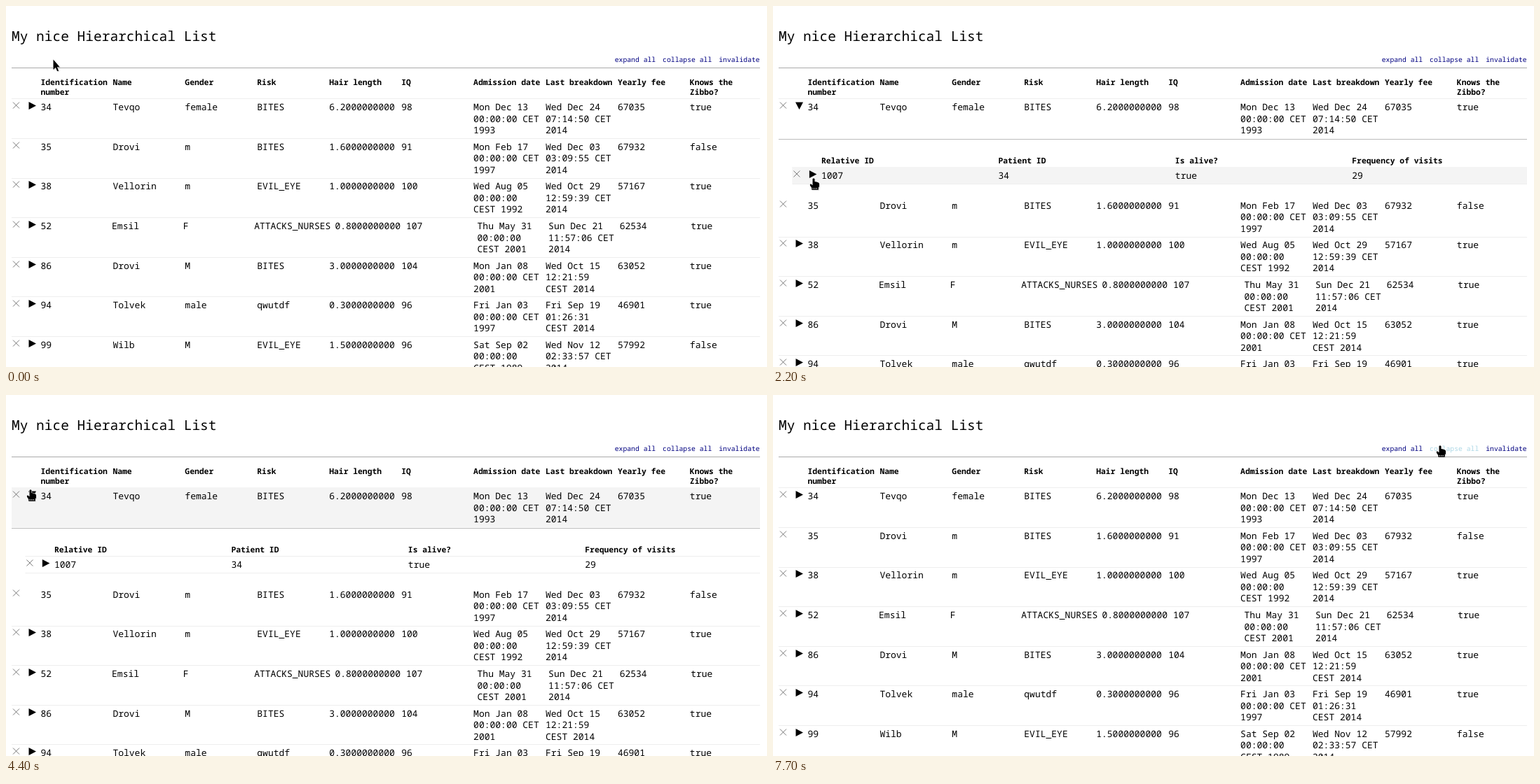
Recreate the animation shown at these times as an HTML page. Size 1086x516 px, loop 8 s.

```html
<!DOCTYPE html>
<html lang="en">
<head>
<meta charset="utf-8">
<title>Hierarchical list</title>
<style>
  html, body { margin: 0; width: 100%; height: 100%; overflow: hidden; background: #fff; }
  svg { display: block; width: 1086px; height: 516px; }
  text {
    font: 13px "Noto Sans Mono", "DejaVu Sans Mono", monospace;
    text-rendering: geometricPrecision;
  }
  .title { font-size: 19.5px; }
  .head { font-size: 11.35px; font-weight: 700; }
  .link { font-size: 9.75px; fill: #000080; }
  .link.hover { fill: #add8e6; }
</style>
</head>
<body>
<svg id="stage" viewBox="0 0 1086 516"></svg>
<script>
const LOOP = 8000, STEP = 100;
const LEFT = 8, RIGHT = 1076, INDENT = 19.4, PAD = 6;
const BODY = { size: 13, line: 16.5, base: 16.8, space: 7.1, cls: '' };
const HEAD = { size: 11.35, line: 13.6, base: 14.8, space: 6.7, cls: 'head' };
const stage = document.getElementById('stage');

const phones = {
  heads: ['Phone ID', 'ID of the relative', 'Phone'],
  rows: ['2008;1007;+(100)-555-0142']
};
const relatives = {
  heads: ['Relative ID', 'Patient ID', 'Is alive?', 'Frequency of visits'],
  rows: ['1007;34;true;29'],
  child: phones
};
const patients = {
  heads: ['Identification number', 'Name', 'Gender', 'Risk', 'Hair length', 'IQ',
    'Admission date', 'Last breakdown', 'Yearly fee', 'Knows the Zibbo?'],
  rows: [
    '34;Tevqo;female;BITES;6.2000000000;98;Mon Dec 13 00:00:00 CET 1993;Wed Dec 24 07:14:50 CET 2014;67035;true',
    '35;Drovi;m;BITES;1.6000000000;91;Mon Feb 17 00:00:00 CET 1997;Wed Dec 03 03:09:55 CET 2014;67932;false',
    '38;Vellorin;m;EVIL_EYE;1.0000000000;100;Wed Aug 05 00:00:00 CEST 1992;Wed Oct 29 12:59:39 CET 2014;57167;true',
    '52;Emsil;F;ATTACKS_NURSES;0.8000000000;107;Thu May 31 00:00:00 CEST 2001;Sun Dec 21 11:57:06 CET 2014;62534;true',
    '86;Drovi;M;BITES;3.0000000000;104;Mon Jan 08 00:00:00 CET 2001;Wed Oct 15 12:21:59 CEST 2014;63052;true',
    '94;Tolvek;male;qwutdf;0.3000000000;96;Fri Jan 03 00:00:00 CET 1997;Fri Sep 19 01:26:31 CEST 2014;46901;true',
    '99;Wilb;M;EVIL_EYE;1.5000000000;96;Sat Sep 02 00:00:00 CEST 1989;Wed Nov 12 02:33:57 CET 2014;57992;false'
  ],
  childless: 1,
  child: relatives
};

// pointer moves: start, end, x, y reached
const moves = [
  [0, 600, 30, 136], [600, 700, 35, 139],
  [1000, 1500, 67, 226], [1700, 1900, 52, 247], [2000, 2200, 58, 246],
  [3400, 3500, 52, 235], [4100, 4200, 38, 153], [4300, 4400, 35, 135],
  [5300, 5400, 167, 200], [5500, 5900, 589, 424], [6000, 6100, 723, 258],
  [6200, 6400, 872, 101], [6400, 6700, 884, 74], [6900, 7300, 955, 68], [7400, 7500, 952, 72]
];

const ease = k => k * k * (3 - 2 * k);

function pointerAt(t) {
  let x = 67, y = 76;
  for (const [start, end, toX, toY] of moves) {
    const k = ease(Math.min(1, Math.max(0, (t - start) / (end - start))));
    x += (toX - x) * k;
    y += (toY - y) * k;
  }
  return { x, y };
}

const depthAt = t => (t >= 1000 && t < 5300) + (t >= 3500 && t < 4000);

const inside = (p, x, y, w, h) => p.x >= x && p.x < x + w && p.y >= y && p.y < y + h;

const text = (x, y, s, cls = '') =>
  `<text class="${cls}" x="${x}" y="${Math.round(y)}">${s}</text>`;

const bar = (x, y, h, fill) =>
  `<rect x="${x}" y="${Math.round(y)}" width="${RIGHT - x}" height="${Math.round(h)}" fill="${fill}"/>`;

const cross = (x, y) =>
  `<path d="M${x - 4.5} ${y - 4.5}l9 9m0-9l-9 9" stroke="#777" fill="none"/>`;

const triangle = (x, y, down) =>
  `<path d="M${x - 5} ${y - 5.5}v11l10.5-5.5z" transform="rotate(${down ? 90 : 0} ${x} ${y})"/>`;

function wrap(s, max) {
  const lines = [];
  for (const word of s.split(' ')) {
    const joined = lines.length ? lines.at(-1) + ' ' + word : word;
    if (lines.length && joined.length <= max) lines[lines.length - 1] = joined;
    else lines.push(word);
  }
  return lines;
}

// equal columns, except that a long word widens its own column
function layout(cells, level, style) {
  const char = style.size * .6, start = 49.5 + INDENT * level, total = 1078.8 - start;
  const even = total / cells.length;
  const needs = cells.map(c => PAD + char * Math.max(...c.split(' ').map(w => w.length)));
  const wide = needs.filter(n => n > even);
  const rest = (total - wide.reduce((a, b) => a + b, 0)) / (cells.length - wide.length);
  let x = start;
  const columns = cells.map((c, i) => {
    const width = needs[i] > even ? needs[i] : rest;
    const column = { x, lines: wrap(c, Math.floor((width - PAD) / char)) };
    x += width;
    return column;
  });
  const rows = Math.max(...columns.map(c => c.lines.length));
  return { columns, height: rows * style.line + style.space };
}

function drawRow(p, cells, level, y, style, open) {
  const { columns, height } = layout(cells, level, style);
  const left = LEFT + INDENT * level;
  let svg = inside(p, left, y, RIGHT - left, height) ? bar(left, y, height, '#f4f4f4') : '';
  svg += bar(left, y + height + (open ? .6 : 0), 1, open ? '#bbb' : '#eee');
  for (const { x, lines } of columns)
    lines.forEach((s, i) => svg += text(x, y + style.base + i * style.line, s, style.cls));
  return { svg, height };
}

function drawTable(p, table, level, top, depth) {
  const shift = INDENT * level;
  const head = drawRow(p, table.heads, level, top, HEAD);
  let svg = head.svg, y = top + head.height;
  table.rows.forEach((data, i) => {
    const open = i === 0 && depth > 0;
    const row = drawRow(p, data.split(';'), level, y, BODY, open);
    const mid = Math.round(y + 9.8);
    svg += row.svg + cross(14.5 + shift, mid);
    if (table.child && i !== table.childless) svg += triangle(37.5 + shift, mid + .5, open);
    y += row.height;
    if (open) {
      const inner = drawTable(p, table.child, level + 1, y + 21, depth - 1);
      svg += inner.svg;
      y = inner.bottom + 19.1;
    }
  });
  return { svg, bottom: y };
}

function drawLinks(p) {
  const char = 5.85;
  let x = 868.7, svg = '', hover = false;
  for (const s of ['expand all', 'collapse all', 'invalidate']) {
    const over = inside(p, x, 70, s.length * char, 16);
    svg += text(x, 80, s, over ? 'link hover' : 'link');
    hover ||= over;
    x += s.length * char + 9.9;
  }
  return { svg, hover };
}

function drawCursor({ x, y }, hand) {
  const shape = hand
    ? 'M-1.5 1.2Q0-.6 1.5 1.2V5L4.5 5.6L7 6.6Q8 7 8 8.5V12L6.8 13.5V16.8H-2.8V14L-5 10.7Q-5.8 8.6-4 8.3L-1.5 10.3Z'
    : 'M.5.5V15L3.8 12L6.1 17.3L8.2 16.4L5.9 11.2H9.8Z';
  const cuff = hand ? '<path d="M-1.6 14.8H6" stroke="#fff" stroke-dasharray="1.5 1"/>' : '';
  return `<g transform="translate(${x} ${y})">
    <path d="${shape}" transform="translate(1 1)" opacity=".2"/>
    <path d="${shape}" stroke="#fff" stroke-width="1.2" paint-order="stroke"/>${cuff}</g>`;
}

function draw(t) {
  const p = pointerAt(t), depth = depthAt(t), links = drawLinks(p);
  const onControl = inside(p, 0, 133, 46, 18) || (depth > 0 && inside(p, 28, 231, 37, 18));
  stage.innerHTML = text(LEFT, 50, 'My nice Hierarchical List', 'title') + links.svg +
    bar(LEFT, 88, 1, '#aaa') +
    drawTable(p, patients, 0, 98.5, depth).svg +
    drawCursor(p, links.hover || onControl);
}

let shown = -1;
function tick() {
  const t = Math.floor(performance.now() % LOOP / STEP) * STEP;
  if (t !== shown) draw(shown = t);
  requestAnimationFrame(tick);
}
tick();
</script>
</body>
</html>
```
